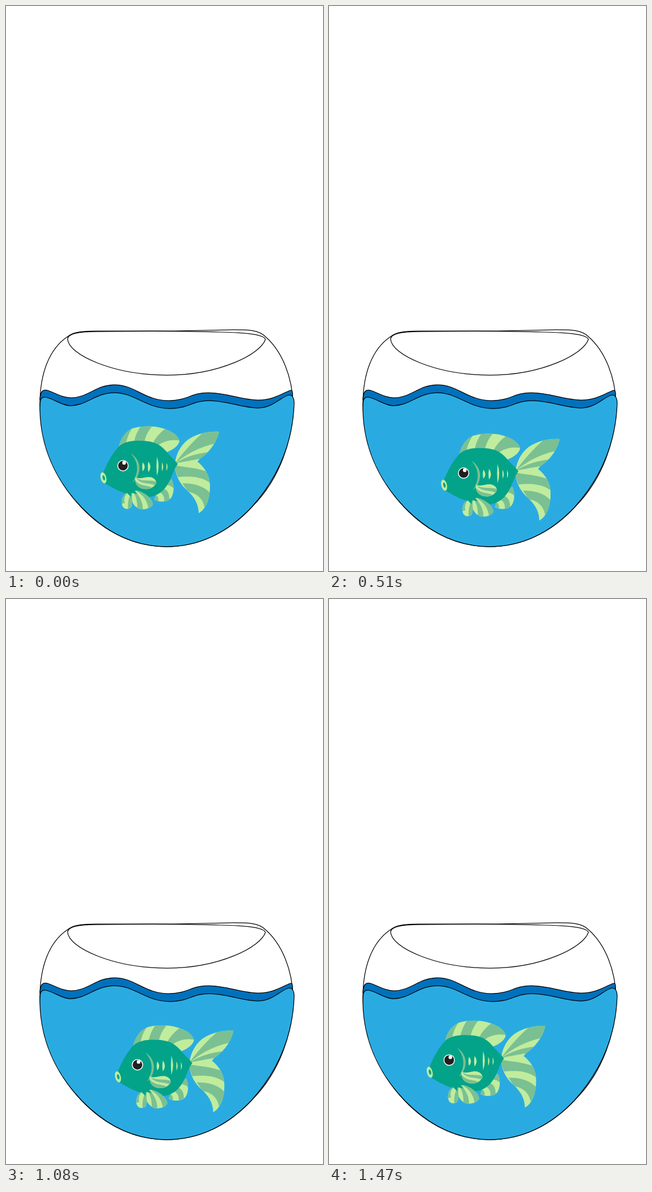
Write an HTML page that moves like this. It is 561x998 px and loops after 1.5 s.

```html
<!DOCTYPE html>
<html lang="en">
<head>
<meta charset="utf-8">
<title>Fish bowl</title>
<style>
html, body { margin: 0; width: 100%; height: 100%; overflow: hidden; background: #fff; }
svg { display: block; width: 561px; height: 998px; }
.line { stroke: #000; stroke-width: 1.25; }
.light { fill: #c0ec9d; }
.mid { fill: #7bc092; }
.teal { fill: #03a389; }
</style>
</head>
<body>
<svg viewBox="0 0 561 998" xmlns="http://www.w3.org/2000/svg">
  <defs>
    <clipPath id="dorsal"><path d="M199 781C203 763 211 752 224 746C236 742 251 742 264 743C283 746 303 754 307 768C306 776 297 783 285 788L250 775L212 779Z"/></clipPath>
    <clipPath id="upper"><path d="M299 808C301 791 309 776 322 766C338 755 359 751 377 752C373 769 363 786 343 800C327 803 312 806 299 808Z"/></clipPath>
    <clipPath id="lower"><path d="M298 808C315 805 331 802 343 800C341 802 340 803 339 805C352 815 361 830 361 848C361 869 355 888 341 896C341 881 334 868 322 857C307 844 300 830 298 808Z"/></clipPath>
    <clipPath id="pelvic"><path d="M222 857C209 859 204 869 205 879C206 888 214 891 221 886C223 883 223 879 223 875C227 884 235 890 243 889C250 889 258 885 260 880C258 869 246 860 232 856Z"/></clipPath>
    <clipPath id="anal"><path d="M293 836C298 846 298 860 292 869C285 877 272 877 262 872L268 858L282 846Z"/></clipPath>
    <clipPath id="pectoral"><path d="M229 832C237 837 246 831 255 832C262 833 266 838 266 842C263 850 253 855 244 853C234 852 227 844 229 832Z"/></clipPath>
  </defs>

  <g class="line" fill="none">
    <path fill="#fff" d="M297 574L160 574C130 574 118 577 109 584C76 606 60 650 60 704C61 765 84 835 133 885C175 930 229 955 284 955C340 955 394 930 436 884C485 835 508 765 508 704C507 656 489 610 459 584C446 571 425 572 395 572Z"/>
    <path d="M109 588C110 579 126 575 160 575C240 574 320 574 380 576C425 577 457 580 459 589C451 614 379 652 285 652C190 652 110 616 109 588Z"/>
    <path fill="#0071bc" d="M60 695C61 682 64 676 74 679C90 685 101 692 115 692C145 692 160 669 192 669C228 669 245 697 288 697C322 697 327 683 358 683C390 683 418 696 446 696C474 696 489 684 503 679C508 678 508 684 505 698L446 712L290 713L115 707Z"/>
    <path fill="#29abe2" d="M60 713C60 698 60 690 70 691C86 694 98 706 114 706C143 706 158 683 192 683C227 683 248 711 290 711C324 711 329 697 360 697C391 697 419 710 446 710C473 710 487 689 502 687C508 688 510 695 510 702C508 760 489 825 434 886C391 931 340 955 284 955C229 955 178 931 134 886C84 834 61 774 60 713Z"/>
  </g>

  <g id="fish">
    <g clip-path="url(#dorsal)">
      <path class="light" d="M190 735H315V795H190Z"/>
      <path class="mid" d="M195 790V735L226 743C217 753 213 765 210 785ZM226 780C226 763 232 752 241 738H263C250 750 245 764 243 780ZM258 776C264 762 274 752 287 743L312 760V769C294 764 280 768 266 778Z"/>
    </g>
    <g clip-path="url(#upper)">
      <path class="light" d="M295 745H380V815H295Z"/>
      <path class="mid" d="M299 808C314 788 331 768 353 750H380L370 773C342 779 318 792 299 808ZM299 808C318 796 335 791 358 788L343 802Z"/>
    </g>
    <g clip-path="url(#lower)">
      <path class="light" d="M290 795H365V900H290Z"/>
      <path class="mid" d="M297 811C316 815 338 815 359 824L364 845C346 829 321 831 304 832ZM312 843C332 843 350 847 363 862L352 890C350 870 338 861 322 858Z"/>
    </g>
    <g clip-path="url(#anal)">
      <path class="light" d="M255 830H300V880H255Z"/>
      <path class="mid" d="M289 833L300 844V858C296 849 290 846 282 846ZM276 851C286 854 290 861 289 874L279 879C282 868 278 861 270 858ZM263 862C269 865 271 870 269 878L260 874Z"/>
    </g>
    <path class="teal" d="M169 833C174 818 184 796 197 781C205 771 221 767 239 768C264 768 274 776 283 786C290 795 298 801 304 809C296 819 294 832 286 845C277 860 263 869 243 867C234 867 228 862 221 858L222 867C218 865 217 862 216 862C199 858 184 848 173 842Z"/>
    <g clip-path="url(#pelvic)">
      <path class="light" d="M200 850H265V895H200Z"/>
      <path class="mid" d="M222 856C211 861 208 868 210 878L202 880V860ZM223 858C217 867 215 878 216 891L226 888C223 876 222 867 224 858ZM225 858C230 866 233 876 232 888L242 891C243 879 238 868 229 857ZM231 857C243 864 250 873 252 889L262 882C258 868 247 860 234 855Z"/>
    </g>
    <path class="teal" d="M212 858L221 867L222 860L232 862L226 854Z"/>
    <path class="mid" d="M221 790C231 797 237 807 236 818C235 829 231 835 224 842C229 833 232 825 232 817C232 806 228 799 221 790Z"/>
    <g clip-path="url(#pectoral)">
      <path class="light" d="M225 828H270V858H225Z"/>
      <path class="mid" d="M229 832C239 842 252 835 268 841L266 847C250 841 238 846 229 832ZM228 837C236 848 246 846 258 850L246 857C237 855 229 849 228 837Z"/>
    </g>
    <g id="scales" class="light"></g>
    <circle cx="207" cy="812" r="10" fill="#fff"/>
    <circle cx="207" cy="812" r="8.5" fill="#231f20"/>
    <circle cx="209" cy="807" r="3.2" fill="#fff"/>
    <g transform="rotate(-14 172.5 833.5)">
      <ellipse class="light" cx="172.5" cy="833.5" rx="5" ry="10"/>
      <ellipse class="teal" cx="173" cy="833.5" rx="2" ry="4.5"/>
    </g>
  </g>
</svg>
<script>
const LOOP = 1500, STEP = 30, TURN = 720;
const fish = document.getElementById("fish");

// x, centre y, half height, half width
const scales = [[243, 814, 8, 3], [253, 814, 9.5, 3], [268, 813, 17, 2.5], [277, 814, 8, 1.6], [285, 814, 7, 1.3]];
document.getElementById("scales").innerHTML = scales.map(([x, y, h, w]) =>
  `<path d="M${x - 1} ${y - h}Q${x + w * 2} ${y} ${x - 1} ${y + h}Q${x - w} ${y} ${x - 1} ${y - h}Z"/>`).join("");

// Swims out at one speed and back a little slower, then snaps to the start.
function render(ms) {
  const t = Math.floor(ms % LOOP / STEP) * STEP;
  const x = t <= TURN ? t * 0.0612 : 44.06 - (t - TURN) * 0.0511;
  fish.setAttribute("transform", `translate(${x.toFixed(2)} ${(x * 0.415).toFixed(2)})`);
}

let start;
function tick(now) {
  start ??= now;
  render(now - start);
  requestAnimationFrame(tick);
}
render(0);
requestAnimationFrame(tick);
</script>
</body>
</html>
```
